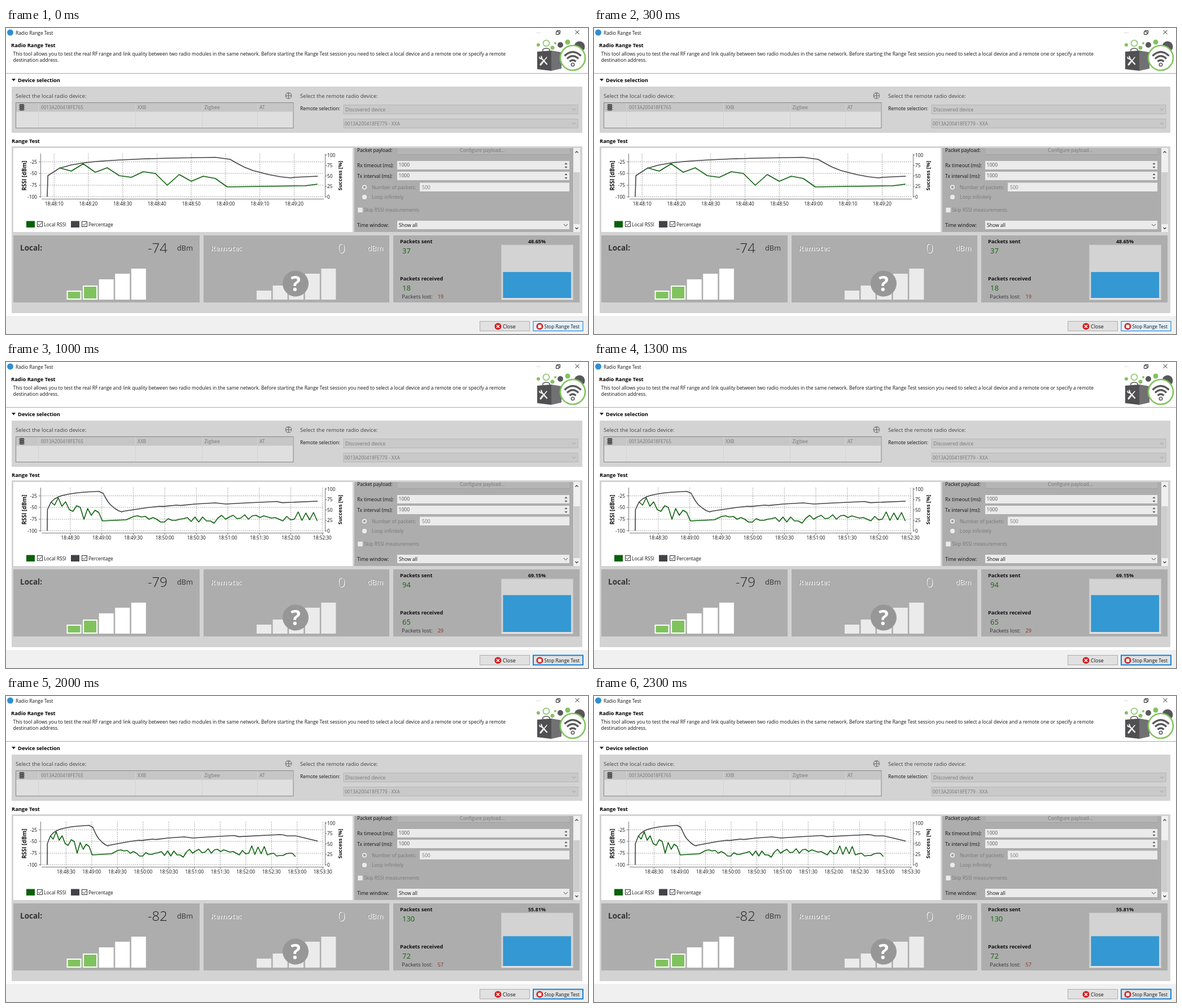
An HTML page that plays this animation: 1031x543 px, repeating every 2.5 s.

```html
<!DOCTYPE html>
<html lang="en">
<head>
<meta charset="utf-8">
<title>Radio Range Test</title>
<style>
html, body { margin: 0; width: 100%; height: 100%; overflow: hidden; background: #fff; }
svg { display: block; width: 1031px; height: 543px; font: 8.55px "Open Sans", "Noto Sans", sans-serif; }
text { fill: #111; white-space: pre; }
.b { font-weight: 700; }
.dim, .dim text { fill: #777; }
.head { font-size: 9.3px; font-weight: 700; fill: #000; }
.mid { text-anchor: middle; }
.end { text-anchor: end; }
.big { font-size: 24px; font-weight: 300; fill: #222; }
.num { font-size: 13px; fill: #126312; }
.line { fill: none; stroke-linejoin: round; stroke-width: 1.6; }
.grid { fill: none; stroke: #999; stroke-width: .9; stroke-dasharray: 2 1.6; }
.state { visibility: hidden; animation: show 2.5s step-end infinite; animation-delay: calc(var(--i) * .5s - 2.5s); }
@keyframes show { 0% { visibility: visible; } 20%, 100% { visibility: hidden; } }
</style>
</head>
<body>
<svg id="stage" viewBox="0 0 1031 543">
  <!-- title bar and banner -->
  <circle cx="7.5" cy="8" r="5.5" fill="#2f8fce"/>
  <text x="17" y="12" font-size="8.4">Radio Range Test</text>
  <path d="M939 8.5h8" stroke="#ddd"/>
  <g fill="none" stroke="#222" stroke-width="1">
    <path d="M974.5 6.5h5v5h-5zM976 6V4.5h5.5v5.5H980M1008.5 4l7 7M1015.5 4l-7 7"/>
  </g>
  <text class="head" x="9" y="34">Radio Range Test</text>
  <text x="12.5" y="48.5">This tool allows you to test the real RF range and link quality between two radio modules in the same network. Before starting the Range Test session you need to select a local device and a remote one or specify a remote</text>
  <text x="12.5" y="60">destination address.</text>
  <g>
    <circle cx="1016" cy="33" r="9.5" fill="#58585a"/>
    <g fill="#82c35f">
      <circle cx="943" cy="30" r="3"/><circle cx="968" cy="35" r="3.5"/>
      <circle cx="995" cy="25" r="4.5"/><circle cx="973" cy="27" r="2"/>
    </g>
    <circle cx="957" cy="27" r="5.5" fill="#fff" stroke="#82c35f" stroke-width="1.5"/>
    <circle cx="982" cy="30" r="5" fill="#58585a"/>
    <path d="M951 42v-4q6-4 12 0v4" fill="none" stroke="#555" stroke-width="1.5"/>
    <path d="M941 42l25-2v36l-25-3z" fill="#505052"/>
    <path d="M966 40l18 3v29l-18 4z" fill="#717174"/>
    <g fill="none" stroke="#fff" stroke-linecap="round">
      <path d="M948 53l10 11" stroke-width="2.4"/>
      <path d="M945 51.5q0 4 4 3M948 50q2 2 1 5M958 52l-5 6" stroke-width="1.5"/>
      <path d="M951 60l-4 5" stroke-width="3"/>
    </g>
    <circle cx="1004" cy="53" r="22" fill="#fff" stroke="#82c35f" stroke-width="2.6"/>
    <g fill="none" stroke="#58585a" stroke-width="3.4">
      <path d="M989.500 49.500q14.500-14 29 0M994 54.500q10-9.500 20 0M998.500 59.500q5.500-5 11 0"/>
      <circle cx="1004" cy="65" r="2.700" fill="#fff" stroke-width="1.600"/>
    </g>
  </g>
  <path d="M0 80.500h1031" stroke="#a9a9a9"/>

  <!-- device selection -->
  <path d="M10 90h7l-3.500 4.500z" fill="#222"/>
  <text class="head" x="21" y="95.500">Device selection</text>
  <rect x="10" y="104" width="1011" height="82" fill="#d3d3d3"/>
  <g font-size="9.600">
    <text x="17" y="123.500" style="fill:#444">Select the local radio device:</text>
    <text x="521" y="123.500" style="fill:#444">Select the remote radio device:</text>
  </g>
  <circle cx="500.500" cy="120" r="6" fill="#8b8b8b"/>
  <g fill="#e2e2e2">
    <circle cx="498" cy="118" r="1.500"/><circle cx="503" cy="118" r="1.500"/>
    <circle cx="498.500" cy="122.500" r="1.500"/><circle cx="503" cy="122.500" r="1.500"/>
  </g>
  <rect x="17.500" y="132.500" width="491.500" height="45" fill="#dfdfdf" stroke="#858585"/>
  <rect x="18" y="133" width="490.500" height="15.500" fill="#c6c6c6"/>
  <path d="M57.500 133v44M229.500 133v44M347.500 133v44M445.500 133v44" stroke="#d2d2d2"/>
  <rect x="24" y="135" width="8" height="11.500" rx="1" fill="#4f4f4f"/>
  <path d="M22.500 137.500h11M22.500 141h11M22.500 144.500h11" stroke="#777" stroke-width="1.200"/>
  <g class="dim">
    <text x="62" y="144" font-size="8.200">0013A200418FE765</text>
    <text x="233" y="144">XXB</text>
    <text x="351.500" y="144" font-size="8.900">Zigbee</text>
    <text x="449" y="144">AT</text>
  </g>
  <text x="521" y="146">Remote selection:</text>
  <g fill="#c9c9c9" stroke="#b7b7b7">
    <rect x="598" y="136.500" width="415" height="16"/>
    <rect x="598" y="161.500" width="415" height="16"/>
  </g>
  <path d="M1003 143l3 3 3-3M1003 168l3 3 3-3" fill="none" stroke="#9b9b9b"/>
  <g class="dim">
    <text x="601" y="148">Discovered device</text>
    <text x="600" y="173" font-size="8.300">0013A200418FE779 - XXA</text>
  </g>

  <!-- range test -->
  <text class="head" x="10" y="203.500">Range Test</text>
  <rect x="10" y="210" width="1011" height="296" fill="#d3d3d3"/>
  <rect x="13" y="213" width="601" height="149" fill="#fff"/>
  <g id="axes">
    <path d="M61.500 223v78M63 303.500h500M565.500 223v78" stroke="#777" fill="none"/>
    <text class="b mid" font-size="10" transform="translate(35.500 262) rotate(-90)">RSSI [dBm]</text>
    <text class="b mid" font-size="9.400" transform="translate(595 262) rotate(-90)">Success [%]</text>
  </g>
  <rect x="36" y="342.500" width="15" height="11.500" fill="#0a600a"/>
  <rect x="115" y="342.500" width="15" height="11.500" fill="#434347"/>
  <g fill="#fff" stroke="#333">
    <rect x="55.500" y="343.500" width="9" height="9"/><rect x="134.500" y="343.500" width="9" height="9"/>
    <path d="M57 348l2.300 2.500 4-5M136 348l2.300 2.500 4-5" fill="none"/>
  </g>
  <text x="67" y="351.500">Local RSSI</text>
  <text x="146" y="351.500" font-size="8.400">Percentage</text>

  <!-- settings -->
  <rect x="617" y="213" width="388" height="149" fill="#adadad"/>
  <rect x="694" y="213" width="304" height="11" fill="#b5b5b5"/>
  <path d="M694 224.500h304" stroke="#a0a0a0"/>
  <svg x="617" y="213" width="388" height="20" viewBox="617 213 388 20">
    <text x="622" y="219.500" font-size="8.600">Packet payload:</text>
    <text class="dim" x="804" y="219.500">Configure payload...</text>
  </svg>
  <g fill="#ebebeb">
    <rect x="693" y="236" width="305" height="15"/>
    <rect x="693" y="255" width="305" height="15"/>
    <rect x="733" y="274.500" width="265" height="15.500"/>
    <rect x="693" y="342" width="305" height="15"/>
    <circle cx="635" cy="282.500" r="4.800" stroke="#999" stroke-width=".8"/>
    <circle cx="635" cy="300" r="4.800" stroke="#999" stroke-width=".8"/>
    <rect x="623" y="318.500" width="9" height="9" stroke="#aaa" stroke-width=".6"/>
  </g>
  <circle cx="635" cy="282.500" r="2.200" fill="#999"/>
  <path d="M989.500 242l2.500-3 2.500 3zM989.500 246l2.500 3 2.500-3zM989.500 261l2.500-3 2.500 3zM989.500 265l2.500 3 2.500-3z" fill="#555"/>
  <path d="M988 348l3.500 3.500 3.500-3.500" fill="none" stroke="#444"/>
  <text x="622" y="247">Rx timeout (ms):</text>
  <text x="622" y="266">Tx interval (ms):</text>
  <text x="695.500" y="245.500" style="fill:#555">1000</text>
  <text x="695.500" y="264.500" style="fill:#555">1000</text>
  <g class="dim">
    <text x="648" y="285.500" font-size="8.600">Number of packets:</text>
    <text x="737" y="285.500">500</text>
    <text x="648" y="303">Loop infinitely</text>
    <text x="634" y="326">Skip RSSI measurements</text>
  </g>
  <text x="622" y="353" font-size="8.700">Time window:</text>
  <text x="696" y="353">Show all</text>
  <rect x="1005" y="213" width="12" height="149" fill="#f0f0f0"/>
  <rect x="1005.500" y="256" width="11" height="92" fill="#cdcdcd"/>
  <path d="M1008.500 221.500l2.500-2.500 2.500 2.500M1008.500 354l2.500 2.500 2.500-2.500" fill="none" stroke="#444" stroke-width="1.300"/>

  <!-- signal panels -->
  <g fill="#adadad">
    <rect x="13" y="368" width="330" height="119"/>
    <rect x="350" y="368" width="329" height="119"/>
    <rect x="686" y="368" width="330" height="119"/>
  </g>
  <text class="b" x="25" y="394.500" font-size="13.500" style="fill:#333">Local:</text>
  <text x="303" y="394.500" font-size="12.800" style="fill:#333">dBm</text>
  <g id="bars"></g>
  <g id="remote"></g>
  <circle cx="513" cy="453.500" r="23" fill="#979797"/>
  <text class="b mid" x="513" y="467" font-size="37" style="fill:#fff">?</text>

  <text class="b" x="698" y="382" font-size="9.150">Packets sent</text>
  <text class="b" x="698" y="448" font-size="9.150">Packets received</text>
  <text x="701" y="480" font-size="9.500" style="fill:#333">Packets lost:</text>
  <rect x="877.500" y="385" width="127" height="97" fill="#d3d3d3" stroke="#c6c6c6"/>
  <path d="M878 481h126.500" stroke="#e6e6e6" stroke-width="2"/>

  <!-- footer -->
  <rect y="511" width="1031" height="32" fill="#f0f0f0"/>
  <rect x="839.500" y="520.500" width="88" height="17" fill="#e1e1e1" stroke="#adadad"/>
  <g id="states"></g>
  <g fill="#d01f1f"><circle cx="871.500" cy="529.500" r="6"/><circle cx="945.500" cy="529.500" r="6"/></g>
  <path d="M869 527l5 5M874 527l-5 5" stroke="#fff" stroke-width="1.700"/>
  <rect x="942.500" y="526.500" width="6" height="6" rx=".5" fill="#fff"/>
  <text x="880" y="532.500" font-size="9">Close</text>
  <text x="953.500" y="532.500" font-size="8.450">Stop Range Test</text>
</svg>
<script>
const $ = id => document.getElementById(id);
const put = (id, html) => $(id).insertAdjacentHTML('beforeend', html);
const text = (x, y, s, cls = '', extra = '') => `<text class="${cls}" x="${x}" y="${y}" ${extra}>${s}</text>`;
const rect = (x, y, w, h, extra) => `<rect x="${x}" y="${y}" width="${w}" height="${h}" ${extra}/>`;

const LEFT = 73, WIDTH = 480, START = 18 * 3600 + 48 * 60 + 8;

// Height of the RSSI line at each received packet
const rssi = [
  248, 254, 241, 256, 248, 262, 265, 255, 258, 279, 260, 272, 263, 267, 282, 280, 277,
  274, 273, 275, 274, 279, 276, 279, 284, 284, 278, 281, 281, 279, 278, 276, 283, 275,
  284, 275, 282, 282, 286, 277, 272, 279, 275, 272, 278, 277, 271, 279, 273, 272, 276,
  273, 275, 277, 276, 279, 282, 274, 280, 279, 266, 281, 268, 280, 267, 282,
  280, 279, 284, 283, 283, 280, 279, 279, 285
];
const rssiTime = i => i < 15 ? 3.5 * (i + 1) : i < 16 ? 75.2 : 78.8 + 3.64 * (i - 16);

// Seconds and height of the success line
const success = [
  [0, 299.5], [.2, 262], [3.5, 249], [7, 243], [10.5, 239.5], [14, 237], [17.5, 235.5],
  [21, 234.3], [28, 232.3], [35, 231], [42, 230.2], [49, 229.5], [53.3, 233], [55, 239],
  [57.5, 247], [60, 253], [64.5, 260], [68, 264], [71, 266], [72, 265], [78.9, 263],
  [97, 258], [107, 256], [110, 256.4], [123, 254], [127, 254.6], [141, 252], [160, 250],
  [170, 252], [190, 250], [213.5, 248], [218, 247.5], [224, 249.6], [257.5, 247],
  [272, 246], [276, 246.5], [280, 248.3], [290.5, 248.3], [301, 252], [316, 257.5]
];

const states = [
  { span: 79, step: 10, count: 17, dbm: -74, sent: 37, got: 18, lost: 19 },
  { span: 213.9, step: 30, count: 54, dbm: -74, sent: 79, got: 54, lost: 25 },
  { span: 258, step: 30, count: 66, dbm: -79, sent: 94, got: 65, lost: 29 },
  { span: 280.3, step: 30, count: 71, dbm: -81, sent: 103, got: 70, lost: 33 },
  { span: 316.5, step: 30, count: 75, dbm: -82, sent: 130, got: 72, lost: 57 }
];

const two = n => String(n).padStart(2, '0');
const clock = s => [s / 3600, s / 60 % 60, s % 60].map(n => two(Math.floor(n))).join(':');
const line = (pts, color) => `<polyline class="line" stroke="${color}" points="${pts.map(p => p.map(v => v.toFixed(1))).join(' ')}"/>`;

function ticks(step, toX) {
  let out = '';
  for (let s = Math.ceil(START / step) * step; toX(s - START) < 563; s += step) {
    const x = toX(s - START).toFixed(1);
    out += `<path class="grid" d="M${x} 223V302"/><path d="M${x} 304v3" stroke="#777"/>`
      + text(x, 314.5, clock(s), 'mid', 'font-size="8.3"');
  }
  return out;
}

function drawState(s, i) {
  const toX = t => LEFT + t * WIDTH / s.span;
  const share = s.got / (s.got + s.lost);
  const fill = 94.5 * share;
  const edge = i ? 'fill="#e1e1e1" stroke="#0078d7" stroke-width="1.8"' : 'fill="#e5f1fb" stroke="#0078d7"';
  return `<g class="state" style="--i:${i}">`
    + ticks(s.step, toX)
    + line(success.filter(p => p[0] <= s.span).map(([t, y]) => [toX(t), y]), '#434347')
    + line(rssi.slice(0, s.count).map((y, k) => [toX(rssiTime(k)), y]), '#0a600a')
    + text(286, 398.5, s.dbm, 'big end')
    + text(702, 399.5, s.sent, 'num')
    + text(702, 466, s.got, 'num')
    + text(764.5, 480, s.lost, '', 'font-size="9.2" style="fill:#8c2a1c"')
    + text(940.5, 382, (share * 100).toFixed(2) + '%', 'b mid', 'font-size="9"')
    + rect(880.5, 479 - fill, 120.5, fill, 'fill="#3498d2"')
    + rect(934, 520.5, 88, 17, edge)
    + '</g>';
}

// Engraved disabled label: light copy below, panel tone above
const engrave = (x, y, s, extra) => text(x + 1, y + 1, s, '', extra + ' style="fill:#fff"')
  + text(x, y, s, '', extra + ' style="fill:#a4a4a4"');

[237.5, 258, 279, 299.5].forEach((y, i) => put('axes',
  `<path class="grid" d="M63 ${y}H563"/><path d="M58 ${y}h3" stroke="#777"/>`
  + text(55, y + 3, -25 * (i + 1), 'end', 'font-size="8.3"')));
[100, 75, 50, 25, 0].forEach((v, i) => put('axes',
  `<path d="M566 ${225.5 + 18.5 * i}h2.5" stroke="#777"/>` + text(569, 228.5 + 18.5 * i, v, '', 'font-size="8.3"')));

[466, 457, 446, 436, 427].forEach((y, i) => {
  const x = 107.5 + 28.6 * i;
  put('bars', rect(x, y, 26, 482 - y, 'fill="#fff"'));
  if (i < 2) put('bars', rect(x + 2, y + 2, 22, 478 - y, 'fill="#80c35e"'));
  put('remote', rect(x + 336.5, y, 26, 482 - y, 'fill="#ebebeb"'));
});
put('remote', engrave(362, 394.5, 'Remote:', 'font-size="13.2" font-weight="700"')
  + engrave(587, 398.5, '0', 'font-size="24" font-weight="300"')
  + engrave(640, 394.5, 'dBm', 'font-size="12.8"'));
put('states', states.map(drawState).join(''));
</script>
</body>
</html>
```
